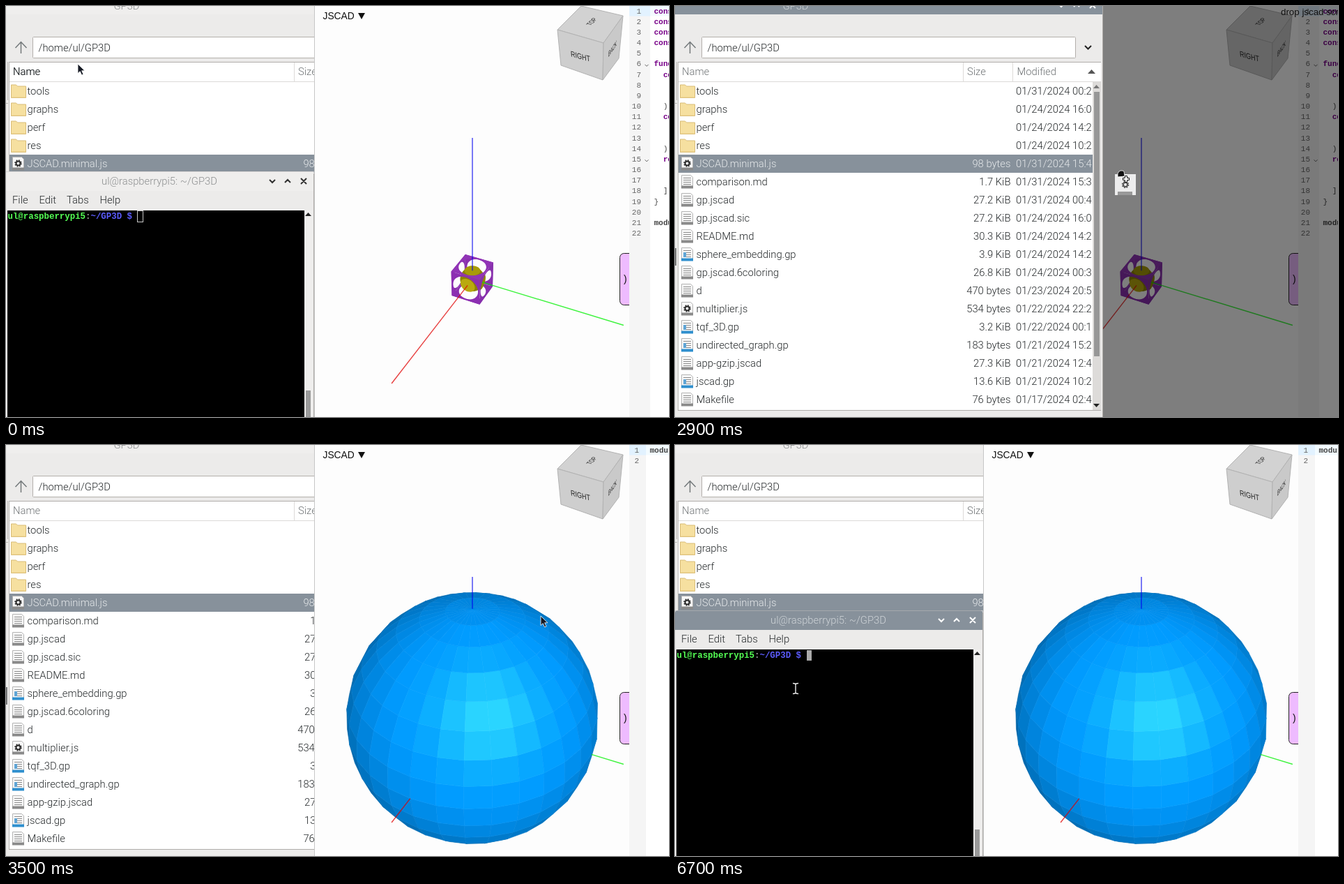
These frames come from a looping animation (951 by 589 pixels, 8000 ms). An HTML page:

```html
<!DOCTYPE html>
<html lang="en">
<head>
<meta charset="utf-8">
<title>Drag and drop</title>
<style>
html, body { margin: 0; width: 100%; height: 100%; overflow: hidden; background: #fdfdfd; }
svg { position: absolute; left: 0; top: 0; width: 951px; height: 589px; }
text { white-space: pre; }
.ui { font: 300 14.8px Roboto, sans-serif; fill: #24282a; }
.dim { fill: #6f7375; }
.end { text-anchor: end; }
.mid { text-anchor: middle; }
.sans { font: 13.8px "Liberation Sans", Arial, sans-serif; fill: #111; }
.tag { font: 12px "Liberation Sans", Arial, sans-serif; fill: #222; text-anchor: middle; }
.mono { font: 11px "Liberation Mono", monospace; fill: #444; }
.num { fill: #666; text-anchor: end; }
.key { font-weight: bold; fill: #770088; }
.word { font-weight: bold; }
.shell { font: bold 12.4px "Liberation Mono", monospace; }
.bar { fill: var(--bar); }
.cap { fill: var(--cap); }
.btn { fill: none; stroke: var(--btn); stroke-width: 2; }
#hover { fill: #1c2022; }
#arrow, #beam, #drag { transform-box: view-box; transform-origin: 0 0; }
</style>
</head>
<body>
<svg id="files" viewBox="0 0 951 589"></svg>
<svg id="web" viewBox="0 0 951 589"></svg>
<svg id="term" viewBox="0 0 951 589"></svg>
<svg id="pointer" viewBox="0 0 951 589"></svg>
<script>
const LOOP = 8000;
const $ = id => document.getElementById(id);
const text = (x, y, s, cls) => `<text x="${x}" y="${y}" class="${cls}">${s}</text>`;
const rect = (x, y, w, h, fill, more = '') =>
  `<rect x="${x}" y="${y}" width="${w}" height="${h}" fill="${fill}" ${more}/>`;
const path = (d, fill, more = '') => `<path d="${d}" fill="${fill}" ${more}/>`;
const line = (d, color, w = 1, more = '') => path(d, 'none', `stroke="${color}" stroke-width="${w}" ${more}`);

// Stepped CSS animation: frames are [ms, declarations]
const sheet = document.head.appendChild(document.createElement('style'));
let count = 0;
function steps(sel, frames) {
  const name = 'k' + count++;
  sheet.append(`@keyframes ${name}{${frames.map(([t, css]) => `${t / LOOP * 100}%{${css}}`).join('')}}
${sel}{animation:${name} ${LOOP}ms step-end infinite}`);
}
const ON = 'visibility:visible', OFF = 'visibility:hidden';

// Window buttons: minimise, maximise, close
const buttons = (x, y) =>
  `<path class="btn" d="M${x - 4} ${y - 2}l4 4 4-4M${x + 18} ${y + 2}l4-4 4 4M${x + 41} ${y - 4}l8 8m0-8l-8 8"/>`;

// ---- File manager ----
const entries = `tools||01/31/2024 00:2
graphs||01/24/2024 16:0
perf||01/24/2024 14:2
res||01/24/2024 10:2
JSCAD.minimal.js|98 bytes|01/31/2024 15:4
comparison.md|1.7 KiB|01/31/2024 15:3
gp.jscad|27.2 KiB|01/31/2024 00:4
gp.jscad.sic|27.2 KiB|01/24/2024 16:0
README.md|30.3 KiB|01/24/2024 14:2
sphere_embedding.gp|3.9 KiB|01/24/2024 14:2
gp.jscad.6coloring|26.8 KiB|01/24/2024 00:3
d|470 bytes|01/23/2024 20:5
multiplier.js|534 bytes|01/22/2024 22:2
tqf_3D.gp|3.2 KiB|01/22/2024 00:1
undirected_graph.gp|183 bytes|01/21/2024 15:2
app-gzip.jscad|27.3 KiB|01/21/2024 12:4
jscad.gp|13.6 KiB|01/21/2024 10:2
Makefile|76 bytes|01/17/2024 02:4`.split('\n').map(r => r.split('|'));

const gear = (x, y, c) => `<circle cx="${x}" cy="${y}" r="3" fill="none" stroke="${c}" stroke-width="2"/>
<circle cx="${x}" cy="${y}" r="4.5" fill="none" stroke="${c}" stroke-width="1.6" stroke-dasharray="1.77"/>`;

function icon(name, y) {
  if (!name.includes('.') && !/^(d|Makefile)$/.test(name))
    return path(`M7.5 ${y - 9}h7l2 2h12v16.5h-21z`, '#f6e0a0', 'stroke="#d9bd78"') +
      line(`M8.5 ${y + 9}h19`, '#e6c983');
  const gp = name.endsWith('.gp');
  const page = path(`M9.5 ${y - 9.5}h13l3 3v15h-16z`, '#f7f7f7', 'stroke="#b4b4b4"') +
    rect(9, y + 5.5, 17, 4, gp ? '#2f8fce' : '#8a8a8a');
  if (name.endsWith('.js')) return page + gear(17.5, y - .5, '#2c2c2c');
  const rows = [-5, -2, 1, 4].map(d => `M12 ${y + d - .5}h11`).join('');
  return page + line(rows, '#8c8c8c', 1.2) + (gp ? rect(12, y - 3, 4, 7, '#5fa5d5') : '');
}

const list = entries.map(([name, size, date], i) => {
  const y = 122 + 26 * i, cls = i == 4 ? 'ui" style="fill:#e6e9eb' : 'ui';
  return (i == 4 ? rect(5, 213, 594, 26, '#87919b') : '') + icon(name, y) +
    text(30.5, y + 5, name, cls) + text(481.5, y + 5, size, cls.replace('ui', 'ui end')) +
    text(489, y + 5, date, cls);
}).join('');

$('files').innerHTML =
  rect(0, 0, 614, 589, '#ecebea') +
  '<rect class="bar" width="614" height="12"/>' + text(173, 4.5, 'GP3D', 'ui cap mid') + buttons(554, -1) +
  line('M21.5 68V52M13.5 60l8-8.5 8 8.5', '#73787a', 1.5) +
  rect(38.5, 44.5, 536, 30, '#fff', 'stroke="#b3afab" rx="1"') +
  text(46.5, 65, '/home/ul/GP3D', 'ui') +
  line('M588 57l4.5 4.5 4.5-4.5', '#222', 2) +
  rect(4, 80, 607, 499, '#fff') +
  line('M2.5 80v55M0 139.5h3M4.5 80v499', '#b9b6b3') + rect(0, 347, 2, 25, '#777') +
  line('M4 80.5h607M4 579.5h607M613.5 0v589', '#b0adaa') + line('M5 108.5h606M413.5 81v27M484.5 81v27', '#dcdad8') +
  text(10, 99, 'Name', 'ui dim') + text(10, 99, 'Name', 'ui" id="hover') +
  text(419, 99, 'Size', 'ui dim') + text(490.5, 99, 'Modified', 'ui dim') +
  path('M592 97l5.5-6 5.5 6z', '#555') +
  `<clipPath id="rows"><path d="M5 109h594v469h-594z"/></clipPath><g clip-path="url(#rows)">${list}</g>` +
  rect(599, 109, 12, 470, '#dddbd9') + rect(601, 123, 8, 379, '#979797') +
  path('M600 118l4.5-5 4.5 5z', '#777') + path('M600 570l4.5 5 4.5-5z', '#222');

// ---- 3D view ----
const AZ = .452, EL = .677, DIST = 4.3, SCALE = 222;
const [ca, sa, ce, se] = [Math.cos(AZ), Math.sin(AZ), Math.cos(EL), Math.sin(EL)];
// World to camera: right, up, towards the viewer
const view = ([x, y, z]) => {
  const f = x * ca + y * sa;
  return [y * ca - x * sa, z * ce - f * se, f * ce + z * se];
};
const project = p => {
  const [x, y, z] = view(p), k = SCALE * DIST / (DIST - z);
  return [669 + x * k, 391.5 - y * k].map(v => v.toFixed(1)).join(' ');
};
const poly = pts => 'M' + pts.map(project).join('L') + 'Z';
const onPlane = (axis, o, a, b) => [[o, a, b], [b, o, a], [a, b, o]][axis];
const ring = (axis, o, r) => poly(Array.from({ length: 32 }, (_, i) =>
  onPlane(axis, o, r * Math.cos(i * Math.PI / 16), r * Math.sin(i * Math.PI / 16))));

const axes = from => [['#e00000', 0], ['#00f000', 1], ['#0000f0', 2]].map(([c, a]) =>
  line(`M${project(onPlane(a, from, 0, 0))}L${project(onPlane(a, 1, 0, 0))}`, c, 1.4, 'opacity=".75"')).join('');

function hollowCube() {
  const u = 1 / 15, h = 1.5 * u;
  const wall = (a, o, fill) => path(
    poly([[-h, -h], [h, -h], [h, h], [-h, h]].map(([p, q]) => onPlane(a, o, p, q))) + ring(a, o, 1.323 * u),
    fill, 'fill-rule="evenodd"');
  return [0, 1, 2].map(a => wall(a, -h, '#8a30ae')).join('') +
    `<circle cx="669" cy="391.5" r="${1.24 * u * SCALE * .96}" fill="#8d8200"/>` +
    ['#b9a90f', '#8f8500', '#a89b08'].map((c, a) => path(ring(a, 1.05 * u, .766 * u), c)).join('') +
    ['#8c2fb2', '#8730ac', '#9134b6'].map((c, a) => wall(a, h, c)).join('') + axes(1.05 * u);
}

function facetSphere(r = .8, seg = 32) {
  const at = (i, j, k = r) => {
    const lon = 2 * Math.PI * i / seg, lat = 2 * Math.PI * j / seg;
    return [k * Math.cos(lat) * Math.cos(lon), k * Math.cos(lat) * Math.sin(lon), k * Math.sin(lat)];
  };
  let out = '';
  for (let j = -seg / 4; j < seg / 4; j++) for (let i = 0; i < seg; i++) {
    const [x, , z] = view(at(i + .5, j + .5, 1));
    if (z * DIST < r * .99) continue;
    const lit = Math.max(0, .11 * x + .994 * z), k = Math.min(1, .6 + .5 * lit), s = lit ** 14;
    const fill = `rgb(${[44 * s ** 1.2, 153 * k + 62 * s, 255 * k].map(Math.round)})`;
    out += path(poly([at(i, j), at(i + 1, j), at(i + 1, j + 1), at(i, j + 1)]), fill, `stroke="${fill}" stroke-width=".6"`);
  }
  return out + axes(r);
}

const label = (m, s) => `<text class="tag" y="4.3" transform="matrix(${m})">${s}</text>`;
const viewCube = '<g stroke="#b2b2b2" stroke-linejoin="round">' +
  path('M791 34L825 0 885 14 857 53z', '#d2d2d2') + path('M791 34L857 53 856 106 796 85z', '#cecece') +
  path('M857 53L885 14 879 75 856 106z', '#c9c9c9') + '</g>' +
  label('.75,.2,.07,.95,824,72', 'RIGHT') + label('.4,-.4,.8,.22,840,22.5', 'TOP') +
  label('.37,-.52,-.05,.95,870,61', 'BACK');

// ---- Code editor ----
const code = [
  [1, 0, 'const'], [2, 0, 'const'], [3, 0, 'const'], [4, 0, 'const'], [6, 0, 'function'], [7, 2, 'const'],
  [10, 2, ')'], [11, 2, 'const'], [14, 2, ')'], [15, 2, 'return'], [18, 2, ']'], [19, 0, '}'], [21, 0, 'module']];
const rowY = n => 10.5 + 15.17 * (n - 1);
const style = w => w == 'module' ? 'mono word' : w.length > 1 ? 'mono key' : 'mono';
function editor(total, gutter, rows, folds) {
  const nums = Array.from({ length: total }, (_, i) => text(gutter - (total > 9 ? 13 : 10), rowY(i + 1), i + 1, 'mono num'));
  return rect(894, 0, 57, 589, '#fff') + rect(894, 0, gutter - 894, 589, '#f5f5f5') +
    rect(894, 0, gutter - 894, 14.5, '#e2f2ff') + rect(gutter, 0, 951 - gutter, 14.5, '#f3fbff') +
    nums.join('') + rows.map(([n, dx, w]) => text(gutter + 5.5 + dx * 6.6, rowY(n), w, style(w))).join('') +
    folds.map(n => line(`M916.5 ${rowY(n) - 2.5}l2.5 2.5 2.5-2.5`, '#666')).join('');
}

$('web').innerHTML = rect(442, 0, 509, 589, '#fdfdfd') + line('M442.5 0v589', '#c6c6c6') +
  text(454.5, 19, 'JSCAD', 'sans') + path('M505 10h10l-5 9z', '#111') + viewCube +
  `<g class="before">${hollowCube()}</g><g class="after">${facetSphere()}</g>` +
  rect(880.5, 354.5, 30, 74, '#eebbff', 'rx="6" stroke="#222"') + text(886, 396, ')', 'sans') +
  `<g class="before">${editor(22, 924, code, [6, 15])}</g>` +
  `<g class="after">${editor(2, 918, [[1, 0, 'module']], [])}</g>` +
  `<g id="shade">${rect(443, 0, 508, 589, '#000', 'opacity=".5"')}${text(869, 13, 'drop jscad script', 'sans" style="font-size:13.33px')}</g>`;

// ---- Terminal ----
$('term').innerHTML = rect(0, 237, 441.5, 352, '#ecebea') +
  '<path class="bar" d="M0 265V241q0-4 4-4H437.500q4 0 4 4V265z"/>' + line('M0 237.500h441', '#c4c2c0', 1, 'opacity=".5"') +
  text(220, 256, 'ul@raspberrypi5: ~/GP3D', 'ui cap mid') + buttons(382, 251) +
  [['File', 9], ['Edit', 47.5], ['Tabs', 87], ['Help', 134.5]].map(([s, x]) => text(x, 283, s, 'ui')).join('') +
  rect(2, 293, 426, 296, '#000') + rect(428, 293, 12, 296, '#efeeed') + line('M441.5 240v349', '#b0adaa') +
  path('M429 301l4.500-5 4.500 5z', '#222') + rect(430, 551, 7, 38, '#9a9a9a') +
  `<text class="shell" x="2.5" y="305" fill="#55ff55">ul@raspberrypi5<tspan fill="#bbb" font-weight="400">:</tspan><tspan fill="#5c5cff">~/GP3D $</tspan></text>` +
  rect(188.5, 293.5, 8, 16, 'none', 'id="idle" stroke="#c8c8c8"') + rect(189, 294, 7, 15, '#aaa', 'id="block"');

// ---- Pointer ----
$('pointer').innerHTML =
  `<g id="arrow">${path('M0 0V13.500L3.200 10.700 5.600 16 8 15 5.700 9.800H10z', '#161a24', 'stroke="#fff" stroke-width=".8"')}</g>` +
  `<g id="beam">${['#000', '#fff'].map((c, i) => line('M-4-7.500q3.500 0 4 1.500q.5-1.500 4-1.500M-4 7.500q3.500 0 4-1.500q.5 1.500 4 1.500M0-6V6', c, 3 - 1.7 * i)).join('')}</g>` +
  `<g id="drag">${rect(-9, 1, 30, 30, '#ededed') + rect(-5, 26, 21, 5, '#999') + gear(6, 16, '#555')}
   ${path('M-5 5V0l2-3 2-1 3 0 2 1 1 7z', '#111', 'stroke="#fff" stroke-width=".8"')}
   ${path('M5.500 3.500h3v3h3v3h-3v3h-3v-3h-3v-3h3z', '#fff', 'stroke="#111"')}</g>`;

const moves = [
  [0, 'arrow', 103, 83], [600, 'arrow', 103, 77], [700, 'beam', 102, 68], [800, 'beam', 102, 65],
  [1000, 'beam', 102, 67], [1100, 'beam', 101, 74], [1200, 'arrow', 96, 90], [1300, 'arrow', 91, 112],
  [1400, 'arrow', 84, 138], [1500, 'arrow', 76, 164], [1600, 'arrow', 68, 188], [1700, 'arrow', 62, 206],
  [1800, 'arrow', 58, 219], [1900, 'arrow', 57, 222],
  [2300, 'drag', 140, 228], [2400, 'drag', 253, 232], [2600, 'drag', 290, 233], [2700, 'drag', 400, 236],
  [2800, 'drag', 520, 238], [2900, 'drag', 640, 240], [3000, 'drag', 720, 241], [3100, 'drag', 755, 243],
  [3200, 'drag', 767, 245], [3400, 'arrow', 767, 245],
  [3700, 'arrow', 620, 190], [3800, 'arrow', 400, 95], [3900, 'arrow', 285, 34],
  [4000, 'beam', 257, 53], [4200, 'beam', 252, 51], [4300, 'beam', 249, 50], [4400, 'none', 0, 0],
  [6100, 'arrow', 147, 86], [6200, 'arrow', 152, 125], [6300, 'arrow', 160, 180], [6400, 'arrow', 166, 240],
  [6500, 'beam', 171, 300], [6600, 'beam', 172, 336], [6700, 'beam', 173, 349]];
for (const shape of ['arrow', 'beam', 'drag'])
  steps('#' + shape, moves.map(([t, s, x, y]) => [t, s == shape ? `${ON};transform:translate(${x}px,${y}px)` : OFF]));

// ---- Window states ----
const FOCUS = '--bar:#87919b;--cap:#cfd4d8;--btn:#fff', BLUR = '--bar:#efeeed;--cap:#8d8f90;--btn:#333';
steps('#files', [[0, BLUR], [2200, FOCUS], [3400, BLUR]]);
steps('#term', [[0, `${BLUR};opacity:1`], [2200, `${BLUR};opacity:0`], [5800, `${FOCUS};opacity:1`]]);
steps('#web', [[0, 'clip-path:inset(0 0 0 442px)'], [2200, 'clip-path:inset(0 0 0 614px)'], [3400, 'clip-path:inset(0 0 0 442px)']]);
steps('#shade', [[0, OFF], [2900, ON], [3500, OFF]]);
steps('.before', [[0, ON], [3500, OFF]]);
steps('.after', [[0, OFF], [3500, ON]]);
steps('#hover', [[0, ON], [600, OFF], [1200, ON], [1300, OFF], [3800, ON], [3900, OFF]]);
steps('#idle', [[0, ON], [5800, OFF]]);
steps('#block', [[0, OFF], [5800, ON]]);
</script>
</body>
</html>
```
